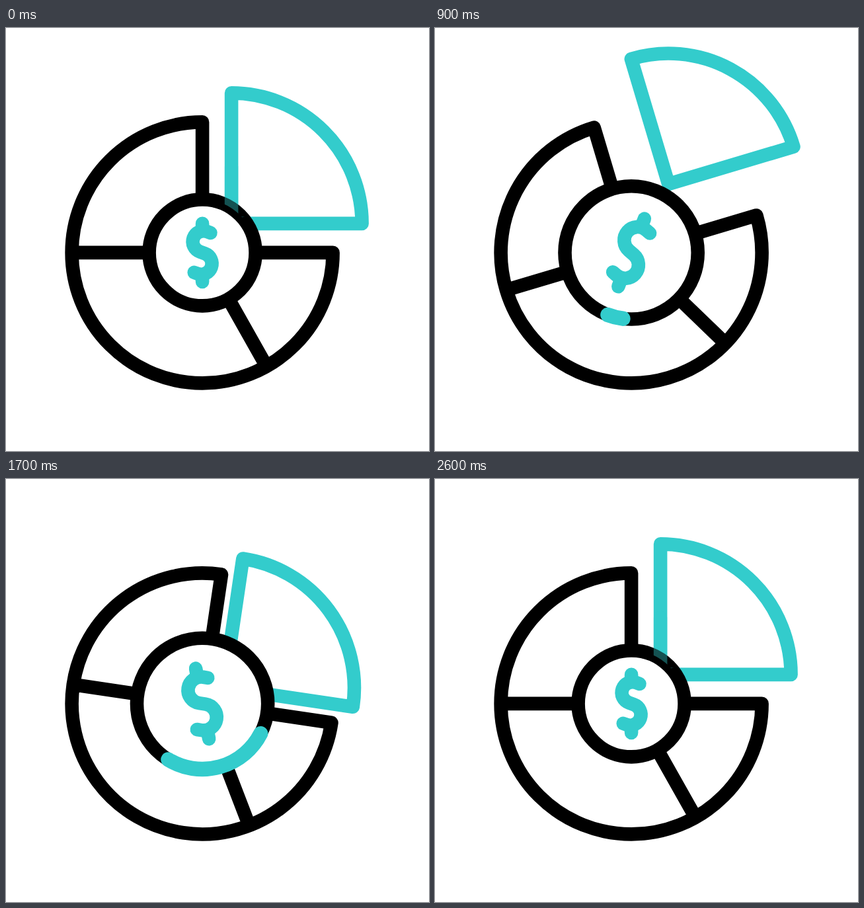
Animation, 640 px wide and 640 px high, one loop 3 s. Source, as an HTML page:

```html
<!DOCTYPE html>
<html lang="en">
<head>
<meta charset="utf-8">
<title>Pie chart</title>
<style>
  html, body { margin: 0; height: 100%; overflow: hidden; background: #fff; }
  svg { display: block; width: 100%; height: 100%; }
  svg * { fill: none; stroke-width: 20.6; stroke-linecap: round; stroke-linejoin: round; vector-effect: non-scaling-stroke; }
  .dark { stroke: #000; }
  .teal { stroke: #3cc; }
  #ring { fill: #fff; }
  #trace { stroke-width: 22.4; }
</style>
</head>
<body>
<svg viewBox="0 0 640 640">
  <defs>
    <clipPath id="outside"><path clip-rule="evenodd" d="M-300-340H343V300H-300ZM-80.5 0a80.5 80.5 0 0 0 161 0a80.5 80.5 0 0 0-161 0Z"/></clipPath>
  </defs>
  <g transform="translate(297.1 339.9)">
    <g id="pie">
      <path class="dark" d="M0 0H197.5A197.5 197.5 0 1 1 0-197.5ZM0 0H-197.5M0 0L97 172"/>
      <path id="slice" class="teal" d="M0 0V-197.5A197.5 197.5 0 0 1 197.5 0Z"/>
    </g>
    <circle id="ring" class="dark"/>
    <g id="overlap" clip-path="url(#outside)" opacity=".4">
      <path class="teal" d="M44-44V-130M44-44H130" clip-path="circle(90.8px at 0 0)"/>
    </g>
    <path id="trace" class="teal"/>
    <g id="dollar" class="teal">
      <path d="M0-44V-34M0 44V34"/>
      <path transform="rotate(19.7)" d="M1.6-32.4H-4a16.2 16.2 0 0 0 0 32.4H4a16.2 16.2 0 0 1 0 32.4H-1.6"/>
    </g>
  </g>
</svg>
<script>
const LOOP = 3000, BEGIN = 200, END = 2600, RADIUS = 80.5, TRACE_START = 113;
const $ = id => document.getElementById(id);
const [pie, slice, ring, overlap, trace, dollar] =
  ['pie', 'slice', 'ring', 'overlap', 'trace', 'dollar'].map($);

const smooth = x => x * x * (3 - 2 * x);
const progress = (t, from, to) => Math.min(1, Math.max(0, (t - from) / (to - from)));
const eased = (t, from, to) => smooth(progress(t, from, to));

// Eases through poses spread evenly over the moving part of the loop.
function swing(t, ...poses) {
  const steps = poses.length - 1;
  const x = progress(t, BEGIN, END) * steps;
  const i = Math.min(steps - 1, Math.floor(x));
  return poses[i] + (poses[i + 1] - poses[i]) * smooth(x - i);
}

function arc(r, from, to) {
  const point = deg => {
    const a = deg * Math.PI / 180;
    return `${r * Math.cos(a)} ${r * Math.sin(a)}`;
  };
  return `M${point(from)}A${r} ${r} 0 ${to - from > 180 ? 1 : 0} 1 ${point(to)}`;
}

function draw(t) {
  const angle = swing(t, 0, -20, 25, -8, 0);
  const shift = swing(t, 44, 85.2, 26, 44);
  const scale = 1 + 0.25 * (eased(t, BEGIN, 890) - eased(t, 1600, 2200));
  const head = 360 * eased(t, 830, 1420);
  const tail = 360 * progress(t, 900, 2040) ** 0.86;
  const start = TRACE_START + angle;

  pie.setAttribute('transform', `rotate(${angle})`);
  slice.setAttribute('transform', `translate(${shift} ${-shift})`);
  ring.setAttribute('r', RADIUS * scale);
  dollar.setAttribute('transform', `rotate(${-1.27 * angle}) scale(${scale})`);
  trace.setAttribute('d', head - tail > 0.5 ? arc(RADIUS * scale, start + tail, start + head) : '');
  overlap.style.display = t > BEGIN && t < END ? 'none' : '';
}

function tick() {
  draw(performance.now() % LOOP);
  requestAnimationFrame(tick);
}
tick();
</script>
</body>
</html>
```
